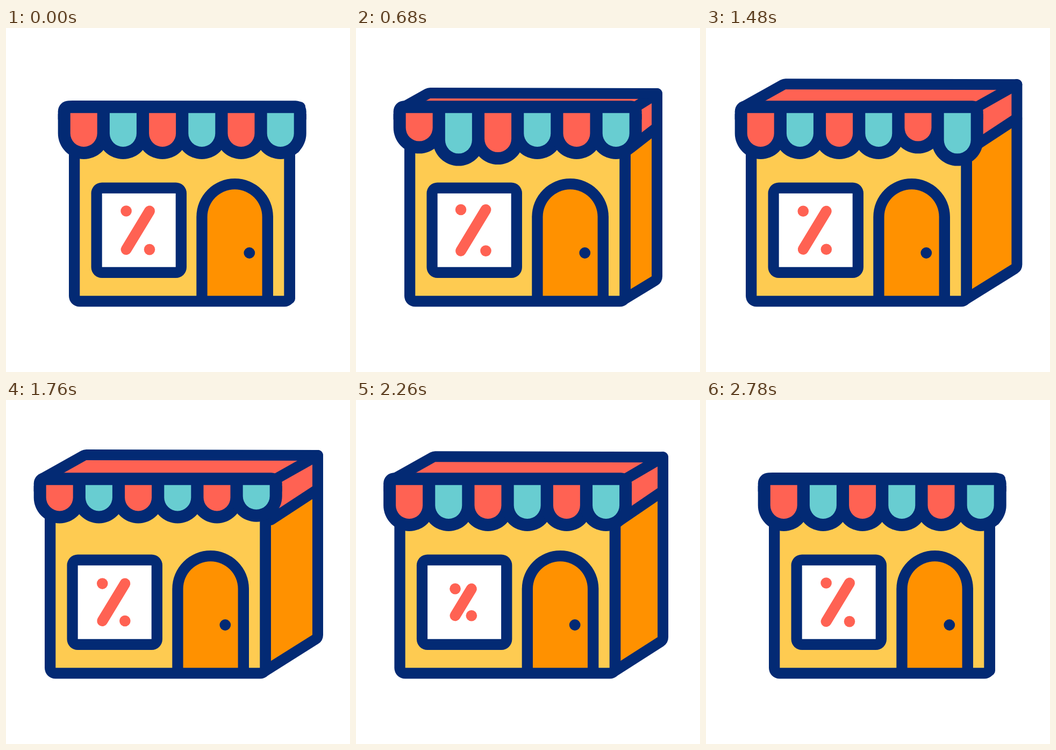
An HTML page with a canvas that plays this animation: 640x640 px, repeating every 3 s.

```html
<!DOCTYPE html>
<html lang="en">
<head>
<meta charset="utf-8">
<title>Shop</title>
<style>
  html, body { margin: 0; width: 100%; height: 100%; overflow: hidden; background: #fff; }
  canvas { display: block; width: 100vmin; height: 100vmin; }
</style>
</head>
<body>
<canvas width="640" height="640"></canvas>
<script>
const ctx = document.querySelector('canvas').getContext('2d');
const LOOP = 3000;
const NAVY = '#032a74', YELLOW = '#fecb51', ORANGE = '#ff9100', RED = '#ff6253', TEAL = '#68cdd1';

// Smooth curve through keys, flat at its ends and at every local extreme
function curve(times, values, t) {
  const last = times.length - 1;
  if (t <= times[0]) return values[0];
  if (t >= times[last]) return values[last];
  const slope = k => {
    if (k === 0 || k === last) return 0;
    const [a, b, c] = values.slice(k - 1, k + 2);
    return (b - a) * (c - b) <= 0 ? 0 : (c - a) / (times[k + 1] - times[k - 1]);
  };
  const i = times.findIndex(time => time > t) - 1;
  const span = times[i + 1] - times[i], p = (t - times[i]) / span, q = 1 - p;
  return q * q * (1 + 2 * p) * values[i] + p * p * (3 - 2 * p) * values[i + 1]
    + span * p * q * (q * slope(i) - p * slope(i + 1));
}

const TURN = [120, 680, 1180, 1760, 2040, 2120, 2280, 2480, 2780];
const SHIFT = [0, 27, 40, 45, 49, 51.5, 44, 19, 0];
const RIGHT = [538, 570, 585, 590, 591, 592, 579, 554, 538];
const TOP = [135, 111, 97.5, 92, 88.7, 87, 97, 120, 135];
const SPREAD = [1, 1.07, 1, 0.97, 0.84, 0.79, 0.69, 0.655, 1];

// Extra length of an awning flap: a wave from the left, then all together
function flapStretch(i, t) {
  const peak = 400 + 200 * i;
  return curve([peak - 200, peak, peak + 200, peak + 420], [0, 28, -15, 0], t)
    + curve([1580, 1780, 2000, 2200], [0, -15, 28, 0], t);
}

function box(color, x, y, w, h, radii = 0) {
  ctx.fillStyle = color;
  ctx.beginPath();
  ctx.roundRect(x, y, w, h, radii);
  ctx.fill();
}

function dot(color, x, y, r) {
  ctx.fillStyle = color;
  ctx.beginPath();
  ctx.arc(x, y, r, 0, 2 * Math.PI);
  ctx.fill();
}

function trace(points) {
  ctx.beginPath();
  for (const [x, y] of points) ctx.lineTo(x, y);
}

function area(color, ...points) {
  trace(points);
  ctx.fillStyle = color;
  ctx.fill();
}

function line(color, ...points) {
  trace(points);
  ctx.strokeStyle = color;
  ctx.stroke();
}

function drawDepth(t, shift) {
  const top = curve(TURN, TOP, t);
  const x = curve(TURN, RIGHT, t) - 10;
  const cornerX = 130 + 0.6 * (120 - top);
  const roofStart = [cornerX - (136 - top) / 0.56, 146];
  const roofLeft = [cornerX, top + 10];
  const roofRight = [x, top + 11];
  const roofFront = [547 - shift, 147];
  const trimFront = [538 - shift, 223];
  const trimBack = [x, top + 74];
  const baseBack = [x, top + 349.5 + 0.32 * (top - 89)];
  const baseFront = [528 - shift, 503.5];

  area(RED, roofStart, roofLeft, roofRight, trimBack, trimFront, roofFront);
  area(ORANGE, trimFront, trimBack, baseBack, baseFront);
  line(NAVY, roofFront, roofRight);
  line(NAVY, trimFront, trimBack);

  ctx.beginPath();
  ctx.moveTo(...roofStart);
  ctx.arcTo(...roofLeft, ...roofRight, 10);
  ctx.lineTo(...roofRight);
  ctx.arcTo(...baseBack, ...baseFront, 10);
  ctx.lineTo(...baseFront);
  ctx.stroke();
}

function drawPercent(spread) {
  const x = 245.3, y = 376.3, dx = 21.7 * spread, dy = 35.8 * spread;
  dot(RED, x - dx, y - dy, 10.3);
  dot(RED, x + dx, y + dy, 10.3);
  line(RED, [x + dx, y - dy], [x - dx, y + dy]);
}

function drawFront(t) {
  box(NAVY, 117, 180, 421, 338.5, [0, 0, 20, 20]);
  box(YELLOW, 137.3, 180, 380, 318.3);

  box(NAVY, 158.5, 287.5, 177.5, 177.5, 20);
  box('#fff', 178.7, 307.8, 137, 137);
  drawPercent(curve(TURN, SPREAD, t));

  box(NAVY, 354.3, 280, 142.7, 225, [71.3, 71.3, 0, 0]);
  box(ORANGE, 374.6, 300.3, 102, 198, [51, 51, 0, 0]);
  dot(NAVY, 452.8, 418.5, 10.4);
}

function drawAwning(t) {
  const flaps = Array.from({ length: 6 }, (_, i) => ({
    x: 144.7 + 73.2 * i,
    bottom: 221 + flapStretch(i, t),
    color: i % 2 ? TEAL : RED
  }));
  box(NAVY, 96.7, 135.2, 462, 35, [20, 20, 0, 0]);
  for (const f of flaps) box(NAVY, f.x - 48, 160, 96, f.bottom - 137, [0, 0, 48, 48]);
  for (const f of flaps) box(f.color, f.x - 25, 158.2, 50, f.bottom - 158.2, [0, 0, 25, 25]);
}

function draw(now) {
  const t = now % LOOP;
  const shift = curve(TURN, SHIFT, t);
  ctx.clearRect(0, 0, 640, 640);
  ctx.lineWidth = 20;
  ctx.lineCap = ctx.lineJoin = 'round';
  drawDepth(t, shift);
  ctx.save();
  ctx.translate(-shift, 0);
  drawFront(t);
  drawAwning(t);
  ctx.restore();
}

const start = performance.now();
function tick() {
  draw(performance.now() - start);
  requestAnimationFrame(tick);
}
tick();
</script>
</body>
</html>
```
